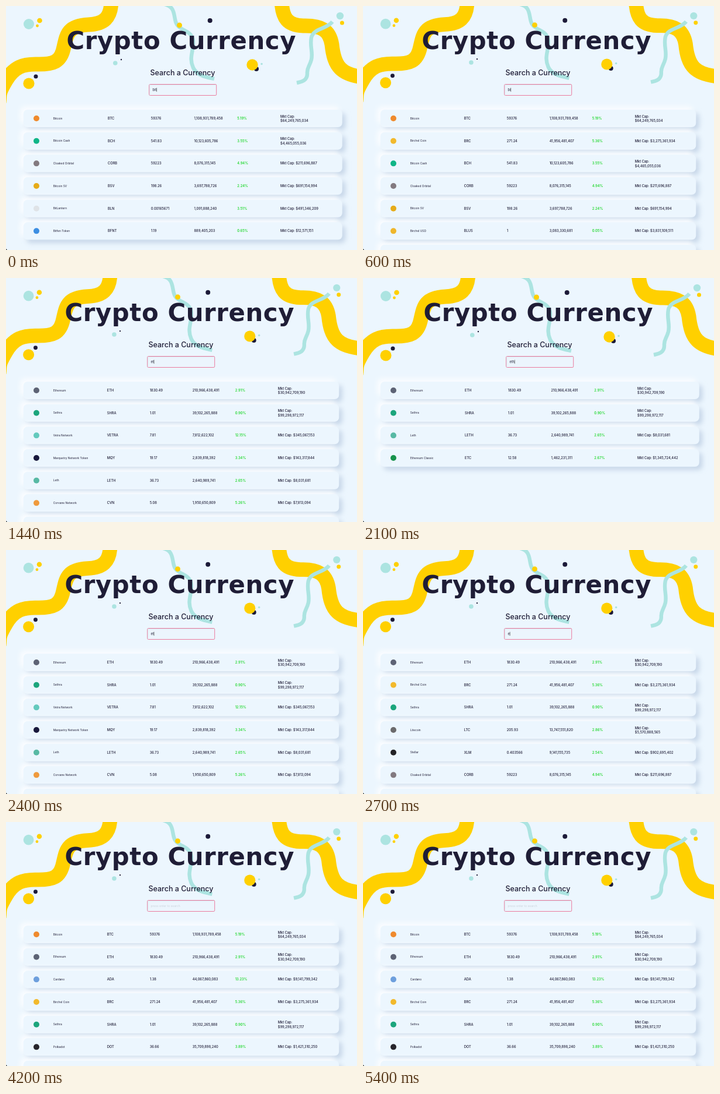
An HTML page for the animation above (5460 ms loop, 600 by 419 pixels).

```html
<!DOCTYPE html>
<html lang="en">
<head>
<meta charset="utf-8">
<title>Crypto Currency</title>
<style>
  html, body { margin: 0; width: 100%; height: 100%; overflow: hidden; background: #ecf6fe; }
  svg { display: block; width: 100%; height: 100%; font-family: Inter, "Open Sans", sans-serif; }
  text { fill: #1f1d36; white-space: pre; }
  .title { font: 700 41.8px "DejaVu Sans", sans-serif; letter-spacing: .6px; }
  .label { font-size: 12.5px; font-weight: 500; text-anchor: middle; }
  .cell { font-size: 5.75px; font-weight: 500; }
  .name { font-size: 4.85px; }
  .up { fill: #22d82e; font-weight: 600; }
  .query { font-size: 5.6px; }
  .hint { fill: #cbd4dc; font-size: 5px; }
  .yellow { fill: #ffd000; }
  .teal { fill: #ace4e1; }
  .dark { fill: #1c1a38; }
  .band, .thread { fill: none; }
  .band { stroke: #ffd000; stroke-width: 25; }
  .thread { stroke: #ace4e1; stroke-width: 6.5; }
</style>
</head>
<body>
<svg viewBox="0 0 600 419" preserveAspectRatio="none">
  <defs>
    <filter id="soft" x="-5%" y="-70%" width="110%" height="240%"><feGaussianBlur stdDeviation="4"/></filter>
  </defs>
  <rect width="600" height="419" fill="#ecf6fe"/>
  <g id="art">
    <path class="band" d="M180-10C180 22 166 31 141 32C106 34 104 48 99 70C94 96 82 101 50 100C30 100 14 104 0 128S-10 150-12 165"/>
    <path class="band" d="M471-10C472 22 482 33 508 34C540 33 553 42 557 66C561 104 572 120 620 123"/>
    <path class="thread" d="M267-4C290 0 286 14 290 27C295 44 318 40 320 60C321 78 312 88 320 106C327 120 342 122 356 125"/>
    <path class="thread" d="M558 27C548 40 526 38 522 54C519 70 525 78 522 92C519 104 514 106 515 116C515 128 506 130 497 132"/>
    <circle class="teal" cx="39" cy="31" r="9"/>
    <circle class="yellow" cx="57.5" cy="25" r="4.3"/>
    <circle class="yellow" cx="53.5" cy="34" r="2.4"/>
    <circle class="dark" cx="51" cy="121" r="3.5"/>
    <circle class="yellow" cx="39" cy="133" r="9.6"/>
    <circle class="teal" cx="186.8" cy="98" r="3.8"/>
    <circle class="dark" cx="197" cy="92" r="1.2"/>
    <circle class="yellow" cx="296.5" cy="33" r="4.5"/>
    <circle class="dark" cx="348.7" cy="25" r="4"/>
    <circle class="dark" cx="428" cy="108" r="4"/>
    <circle class="yellow" cx="421" cy="101" r="9.7"/>
    <circle class="teal" cx="437" cy="99.5" r="1.8"/>
    <circle class="teal" cx="571" cy="17" r="6.2"/>
    <circle class="yellow" cx="574.5" cy="29" r="3.5"/>
  </g>
  <g id="head">
    <text class="title" x="103.5" y="73.8">Crypto Currency</text>
    <text class="label" x="302" y="119.3">Search a Currency</text>
    <rect x="244.7" y="134.5" width="115" height="19" rx="1.8" fill="#ecf5fd" stroke="#ea7c9e"/>
    <path d="M245.7 152.5V135.5H359" fill="none" stroke="#d8e2eb"/>
    <text id="query" x="250.5" y="146"></text>
    <path id="caret" stroke="#222" stroke-width=".6"/>
  </g>
  <g id="list"></g>
  <path d="M0 416.5V419H2.5Q.5 418.5 0 416.5Z" fill="#111"/>
</svg>
<script>
const LOOP = 5460, KEY = 240;
const $ = id => document.getElementById(id);

// name; symbol; price; volume; change; market cap ("/" breaks the line); icon colour
const COINS = `
Bitcoin;BTC;59376;1,108,931,789,458;5.19;/64,249,765,034;#ef8a2d
Ethereum;ETH;1830.49;210,966,438,491;2.91;/30,942,709,190;#5d6375
Cardano;ADA;1.38;44,067,860,083;13.23;9,141,799,342;#6d9fdd
Birchel Coin;BRC;271.24;41,956,481,407;5.36;3,275,361,934;#f2b92c
Sethra;SHRA;1.01;39,102,265,888;0.90;/99,298,972,117;#1ba57c
Polkadot;DOT;36.66;35,709,898,240;3.89;1,421,310,250;#26242b
Litecoin;LTC;205.93;13,747,551,820;2.86;/5,570,888,565;#6b6a6c
Bitcoin Cash;BCH;541.83;10,123,605,786;3.55;/4,465,055,036;#0fb587
Stellar;XLM;0.403566;9,141,155,735;2.54;902,695,402;#222226
Cloaked Orbital;CORB;59223;8,076,315,145;4.94;211,696,887;#837a80
Vetra Network;VETRA;7.81;7,812,622,102;12.15;345,067,153;#63c9bd
Bitcoin SV;BSV;198.26;3,697,788,726;2.24;691,154,994;#e6ab18
Birchel USD;BLUS;1;3,083,330,681;0.05;3,831,109,511;#efb62b
Marquetry Network Token;MQY;19.17;2,839,818,392;3.34;143,317,844;#18183c
Leth;LETH;36.73;2,640,989,741;2.65;8,031,681;#58b9a4
Corvane Network;CVN;5.08;1,950,650,809;5.26;7,813,094;#ef9a3d
Ethereum Classic;ETC;12.58;1,462,231,311;2.67;1,345,724,442;#17924c
BitLantern;BLN;0.00165671;1,091,888,240;3.51;491,346,209;#dfe3e7
Bitfen Token;BFNT;1.19;889,405,203;0.65;12,571,151;#3c8ee2
`.trim().split("\n").map(line => line.split(";"));

// One key per beat: erase "bit", type "eth", pause, erase it again.
function queryAt(t) {
  const keys = start => Math.min(3, Math.max(0, Math.floor((t - start) / KEY)));
  if (t < 1200) return "bit".slice(0, 3 - keys(240));
  if (t < 2400) return "eth".slice(0, keys(960));
  return "eth".slice(0, 3 - keys(2160));
}

const label = (x, y, s, cls = "cell") => `<text class="${cls}" x="${x}" y="${y}">${s}</text>`;

function card([name, symbol, price, volume, change, cap, color], i, scrolled) {
  const y = 193 + 38.67 * i, base = y + 2.1;
  const width = scrolled ? 539.5 : 545;
  const col = n => scrolled ? 172.7 + 73 * n : 174 + 73.75 * n;
  const box = (shift, fill, extra = "") =>
    `<rect x="${29.7 + shift}" y="${y - 15 + shift}" width="${width}" height="30" rx="7" fill="${fill}" ${extra}/>`;
  const blur = 'filter="url(#soft)"';
  const money = cap[0] === "/"
    ? label(col(4), y - 1.5, "Mkt Cap:") + label(col(4), y + 6.2, "$" + cap.slice(1))
    : label(col(4), base, "Mkt Cap: $" + cap);
  return box(5.5, "#c6d6e8", blur) + box(-5, "#fbfdff", blur) + box(0, "#ecf6fe") +
    `<circle cx="52" cy="${y}" r="5" fill="${color}"/>` +
    label(80.7, y + 1.7, name, "name") +
    [symbol, price, volume].map((s, n) => label(col(n), base, s)).join("") +
    label(col(3), base, change + "%", "cell up") + money;
}

function show(query) {
  const rows = COINS.filter(([name]) => name.toLowerCase().includes(query));
  const scrolled = rows.length > 6;
  $("list").innerHTML = rows.slice(0, 7).map((coin, i) => card(coin, i, scrolled)).join("");
  $("art").setAttribute("transform", `scale(${scrolled ? 0.99 : 1})`);
  $("head").setAttribute("transform", `translate(${scrolled ? -3 : 0})`);
  const field = $("query");
  field.textContent = query || "press enter to search";
  field.setAttribute("class", query ? "query" : "hint");
  const end = 250.9 + field.getComputedTextLength();
  $("caret").setAttribute("d", query ? `M${end} 140.6v6.6` : "");
}

let current = null;
function draw(t) {
  const query = queryAt(t);
  if (query !== current) show(current = query);
}

const begin = performance.now();
function tick() {
  draw((performance.now() - begin) % LOOP);
  requestAnimationFrame(tick);
}
tick();
</script>
</body>
</html>
```
